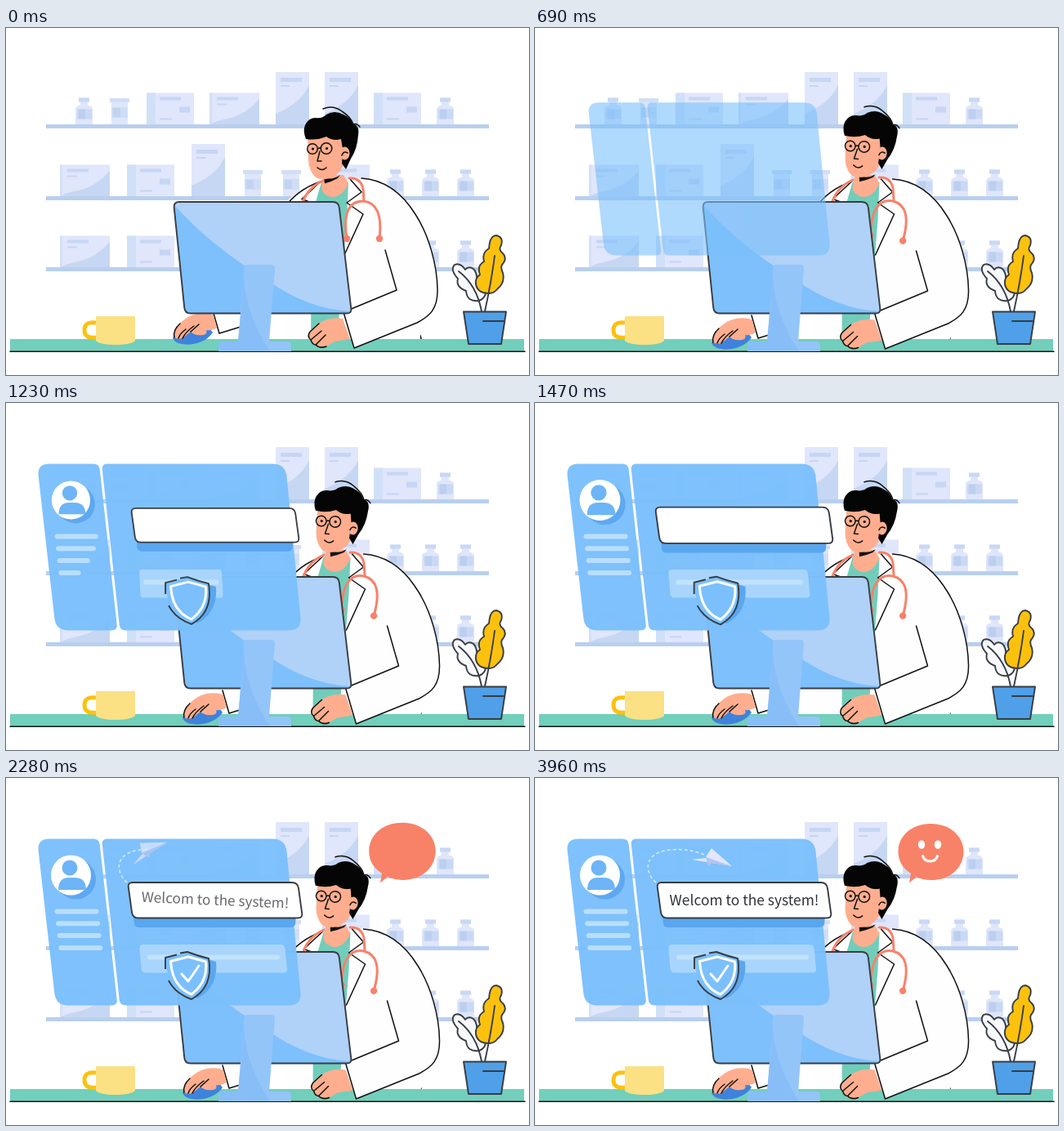
An HTML page that plays this animation: 640x425 px, repeating every 4500 ms.

```html
<!DOCTYPE html>
<html lang="en">
<head>
<meta charset="utf-8">
<title>Pharmacy desk</title>
<style>
html, body { margin: 0; width: 100%; height: 100%; overflow: hidden; background: #fff; }
svg { display: block; width: 100vw; height: 100vh; }
.ink { fill: none; stroke: #111; stroke-width: 1.5; stroke-linecap: round; stroke-linejoin: round; }
.coat { fill: #fefefe; }
.skin { fill: #feae8e; }
.steth { fill: none; stroke: #f8816a; stroke-width: 3; stroke-linecap: round; }
.edge { stroke: #383c43; stroke-width: 1.9; stroke-linejoin: round; }
.white { fill: none; stroke: #fff; stroke-width: 3; stroke-linecap: round; stroke-linejoin: round; }
text { font: 500 17.4px "Noto Sans CJK SC", "Noto Sans CJK JP", "Open Sans", sans-serif; fill: #2f3237; text-anchor: middle; }
</style>
</head>
<body>
<svg viewBox="0 0 640 425" xmlns="http://www.w3.org/2000/svg">
  <defs>
    <g id="bottle">
      <path d="M4 0H17V5H4ZM6 5H15V9Q21 10 21 14V33H0V14Q0 10 6 9Z" fill="#dfe6fa"/>
      <path d="M4 0H17V5H4ZM2 14H20V26H2Z" fill="#c9d8f4"/>
      <path d="M4 14H12V26H4Z" fill="#bccfef"/>
    </g>
    <g id="jar">
      <path d="M2 4H22V32H2Z" fill="#dfe6fa"/>
      <path d="M0 0H24V5H0Z" fill="#d2def6"/>
      <path d="M2 11H22V24H2Z" fill="#d0ddf6"/>
      <path d="M4 12H13V23H4Z" fill="#c0d3f1"/>
    </g>
    <g id="pack">
      <path d="M0 0H58V39H0Z" fill="#e0e6fb"/>
      <path d="M0 0H11V39H0Z" fill="#d0e0f6"/>
      <path d="M16 5H42V9H16ZM40 17H53V24H40ZM16 31H31V33H16Z" fill="#c6d6f4"/>
    </g>
    <g id="carton">
      <path d="M0 0H61V39H0Z" fill="#e0e6fb"/>
      <path d="M0 39Q8 34 20 32Q45 27 61 7V39Z" fill="#c6d7f3"/>
      <path d="M0 0H3V39H0Z" fill="#d3e0f7"/>
      <path d="M9 5H35V9H9ZM9 13H21V15H9Z" fill="#c6d6f4"/>
    </g>
    <g id="tall">
      <path d="M0 0H41V64H0Z" fill="#e0e6fb"/>
      <path d="M0 64V51Q30 39 41 16V64Z" fill="#c6d7f3"/>
      <path d="M6 7H32V12H6ZM6 16H17V18H6Z" fill="#c6d6f4"/>
    </g>
    <mask id="reveal" maskUnits="userSpaceOnUse" x="100" y="60" width="160" height="100">
      <path id="trailMask" class="white"/>
    </mask>
  </defs>
  <rect width="640" height="425" fill="#fff"/>
  <g id="shelves"></g>

  <path class="coat" d="M340 300H505V366L508 381H340Z"/>
  <path class="ink" d="M505 366L508 381"/>
  <g id="torso">
    <path class="coat" d="M340 220Q356 200 385 189L435 184C468 186 488 207 501.500 229L520 300V350L505 381H340Z"/>
    <path d="M386 189Q400 183 419 189L417 235L405 385H373L374 230Z" fill="#71cdba"/>
    <path class="coat" d="M385 188L363 210L376 216H340Q356 198 385 188Z"/>
    <path class="ink" d="M340 221Q356 198 385 188L362 209.500L374 214"/>
    <path class="coat" d="M421 185L435 201L417 214L437 228L414 278L424 350L470 330L450 190Z"/>
    <path class="ink" d="M421 185L435 201L417 214L437 228L414 278"/>
    <path class="skin" d="M389 180H413L419 190Q412 207 399 207Q387 205 386 196Z"/>
  </g>
  <path d="M5 381H634V396H5Z" fill="#71cfbb"/>
  <path d="M5 396.3H635" class="ink"/>

  <g id="mouseHand">
    <path d="M204 379C206 391 240 392 253 373L246 364Q224 367 204 379Z" fill="#3f82dc"/>
    <path class="coat" d="M253 346L261 374L300 362L298 335Z"/>
    <path class="ink" d="M253 346L261 374L300 362"/>
    <path class="skin" d="M206 379Q203 369 217 358Q230 347 250 350L254 352L258 367Q252 371 245 370Q247 375 241 376Q230 377 226 372L216 380Q210 382 206 379Z"/>
    <path class="ink" d="M206 379Q204 370 213 362M211 380Q213 374 220 369M216 380Q220 372 230 365M226 372L236 363"/>
  </g>

  <g id="sleeve">
    <path class="coat" d="M478 321L413 348L426 392L503 361C518 353 528.500 345 528 320C527.500 290 517.500 254 501.500 229L464 272Z"/>
    <path class="ink" d="M464 272L478 321L413 348L426 392L503 361C518 353 528.500 345 528 320C527.500 290 517.500 254 501.500 229C488 207 468 186 435 184"/>
  </g>
  <g id="restHand">
    <path class="skin" d="M412 356Q396 353 383 362L372 372Q368 378 373 382Q373 387 379 388Q384 394 392 390L402 384L421 381Z"/>
    <path class="ink" d="M383 362L372 372Q368 378 373 382L386 371M373 382Q375 388 379 388L391 376M379 388Q384 393 392 390"/>
  </g>

  <path id="neckTube" class="steth" d="M363 213Q370 195 388 187M420 184Q434 183 437 197L438 212"/>
  <g id="steth">
    <path class="steth" d="M417 258Q410 212 437 212Q462 214 457 258"/>
    <circle cx="417" cy="258" r="4.2" fill="#f8816a"/>
    <circle cx="457" cy="258" r="4.2" fill="#f8816a"/>
  </g>

  <g id="head">
    <path d="M389 183Q399 187 409 180L406 184Q399 188 390 190.500Z" fill="#111"/>
    <path class="skin" d="M369 130L370 162Q371 176 379 183Q386 187 396 184Q408 180 413 168L416 130Z"/>
    <path d="M367 136Q363 126 366 119Q370 110 379 110Q387 111 392 106Q402 100 413 106Q422 110 424 117Q433 119 431 131Q430 148 422 160L416 173L411 166L412 148L410 136Q400 139 392 133Q380 138 367 136Z" fill="#050505"/>
    <ellipse class="skin" cx="414.500" cy="153.500" rx="6" ry="8"/>
    <path class="ink" d="M411 156Q413 150 418 153M388 99Q400 94 411 102Q422 109 425 118Q429 116 433 121"/>
    <circle class="ink" cx="375" cy="148" r="6.300"/>
    <circle class="ink" cx="392" cy="147.500" r="6.800"/>
    <path class="ink" d="M381.500 148Q383 146 385 147.500M384 151L381 163H386M381 171Q387 176 392 171"/>
    <circle cx="375.500" cy="148" r="1.600"/><circle cx="392.500" cy="147.500" r="1.600"/>
  </g>

  <path d="M110 361Q96 359 96 370Q96 381 111 379" fill="none" stroke="#fcc10d" stroke-width="5"/>
  <path d="M110 353H158V383Q153 388 134 388Q115 388 110 383Z" fill="#fbe084"/>

  <g class="edge" fill="none" stroke-linecap="round">
    <path fill="#f7f9fd" d="M579 334Q564 336 563 322Q550 317 553 307Q543 296 549 290Q556 287 562 296Q566 291 572 295Q577 300 576 309Q588 312 587 323Q587 331 579 334Z"/>
    <path d="M554 298Q576 315 582 347"/>
    <path fill="#fcc10d" d="M591 325Q577 325 575 314Q574 306 580 302Q576 291 585 286Q582 275 591 270Q592 254 600 254Q609 256 606 266Q602 272 608 276Q614 282 607 290Q605 294 608 300Q611 312 601 320Q597 325 591 325Z"/>
    <path d="M598 279Q594 310 586 347"/>
    <path fill="#4fa0e8" d="M560 347.500H612L606 387H566Z"/>
    <path d="M584 359H609"/>
  </g>

  <path id="screen" fill="#b0d1f8"/>
  <path d="M206 219L219 344Q220 349 225 349H418L423 347Q370 345 318 308Q252 268 207 218Z" fill="#7dc0fb"/>
  <path id="bezel" class="edge" fill="none"/>
  <path d="M296 290H325Q329 290 329 295L322 384H344Q349 384 349 389V396H260V389Q260 384 265 384H284Q288 340 291 295Q291 290 296 290Z" fill="#93c5f9"/>
  <path d="M291 296Q290 345 323 396H260V389Q260 384 265 384H284Q289 340 291 296Z" fill="#88bef7"/>

  <g id="panel" fill="#7bc0fc"><path id="sideCard"/><path id="mainCard"/></g>

  <g id="avatar">
    <circle cx="85.500" cy="124" r="24.500" fill="#5da8f0"/>
    <circle cx="79.500" cy="119" r="24.500" fill="#fff"/>
    <circle cx="78" cy="110" r="9.500" fill="#6db5f7"/>
    <path d="M64 137Q64 122 77 122H84Q98 122 98 137Z" fill="#6db5f7"/>
  </g>
  <g id="rows" stroke="#b9defd" stroke-width="6" stroke-linecap="round"></g>
  <g id="pill">
    <path id="pillBox" fill="#a9d5fc"/>
    <path d="M176 219.500H332" stroke="#c1e2fd" stroke-width="6" stroke-linecap="round"/>
  </g>
  <g id="shield">
    <path d="M204 224L231 217L257 225Q260 256 234 270Z" fill="#5aa6ef"/>
    <path d="M195 220L223 213L249 221Q254 254 228 271Q196 260 195 220Z" fill="#7bc0fc"/>
    <path class="edge" fill="none" d="M195 234V220L209 216.500M213 214.500L222 213Q235 218 248 221Q254 256 227 271Q207 264 199 248"/>
    <path class="white" d="M201.500 224.500L223 219L244.500 225Q247 250 227 265Q203 255 201.500 224.500Z"/>
  </g>
  <path id="check" class="white" d="M215 240L223 249L236 230" pathLength="1" stroke-dasharray="1 2"/>

  <g id="trail" mask="url(#reveal)">
    <path id="route" fill="none" stroke="#d5eafd" stroke-width="1.500" stroke-dasharray="4 3" d="M148 128C131 112 136 90 166 88C186 86 202 91 217 98"/>
  </g>
  <g id="plane">
    <path d="M-25 2L-8 0L24 10ZM-1 -12L24 10L-8 -1Z" fill="#e3e6fc"/>
    <path d="M-8 0L24 10L-1 6L-5 10Z" fill="#b8c3ee"/>
  </g>

  <g id="box">
    <path id="boxShade" fill="#5aa6ef"/>
    <path id="boxFace" class="edge" fill="#fff"/>
  </g>
  <g id="hello"><text x="0" y="6">Welcom to the system!</text></g>

  <g id="bubble">
    <path d="M484 56C509 56 524.500 72 524.500 90C524.500 110 508 125 485 125Q474 125 467 121L458 128.500L460 117Q444 107 444.500 89C445 71 461 56 484 56Z" fill="#f88267"/>
  </g>
  <g id="face" fill="#fff">
    <ellipse class="eye" cx="473"/><ellipse class="eye" cx="494"/>
    <path id="smile" class="white" d="M474.500 95.500C477 104 490 104 492.500 95.500" pathLength="1" stroke-dasharray="1 2"/>
  </g>
</svg>
<script>
const LOOP = 4500;
const $ = id => document.getElementById(id);
const clamp = u => Math.max(0, Math.min(1, u));
const span = (t, a, b) => clamp((t - a) / (b - a));
const mix = (a, b, u) => a + (b - a) * u;
const easeOut = u => 1 - (1 - u) * (1 - u);
const easeInOut = u => (1 - Math.cos(Math.PI * u)) / 2;
const backOut = u => 1 + 2.1 * (u - 1) ** 3 + 1.1 * (u - 1) ** 2;

// Closed polygon with rounded corners; each point is [x, y, radius].
function rounded(points) {
  const n = points.length;
  const toward = (p, q) => {
    const k = p[2] / Math.hypot(q[0] - p[0], q[1] - p[1]);
    return `${mix(p[0], q[0], k)} ${mix(p[1], q[1], k)}`;
  };
  return points.map((p, i) =>
    `${i ? 'L' : 'M'}${toward(p, points[(i + n - 1) % n])}Q${p[0]} ${p[1]} ${toward(p, points[(i + 1) % n])}`
  ).join('') + 'Z';
}
const shape = (id, ...points) => $(id).setAttribute('d', rounded(points));

for (const id of ['screen', 'bezel'])
  shape(id, [205, 213, 7], [407, 213, 7], [423, 349.5, 6], [219, 349.5, 7]);
shape('sideCard', [38, 74.5, 15], [114, 74.5, 7], [136.5, 278.5, 7], [61, 278.5, 15]);
shape('mainCard', [117, 74.5, 7], [342, 74.5, 16], [362, 278.5, 16], [139.5, 278.5, 7]);
shape('pillBox', [163, 204, 5], [341, 204, 5], [344.5, 238.5, 5], [166, 238.5, 5]);
shape('boxShade', [155, 150, 5], [356, 150, 5], [354, 183, 6], [157, 183, 6]);
shape('boxFace', [149, 128, 6], [357, 128, 7], [363, 171.5, 6], [155, 171.5, 7]);

const shelves = [
  [118, { bottle: [85, 527], jar: [127], pack: [172, 450], carton: [249], tall: [330, 390] }],
  [206, { carton: [66], pack: [148, 387], tall: [227], jar: [290, 337], bottle: [466, 509, 552] }],
  [293, { carton: [66], pack: [148], bottle: [509, 552] }]
];
const heights = { bottle: 32.5, jar: 32, pack: 38.5, carton: 38.5, tall: 64 };
$('shelves').innerHTML = shelves.map(([y, items]) =>
  Object.entries(items).map(([kind, xs]) =>
    xs.map(x => `<use href="#${kind}" x="${x}" y="${y - heights[kind]}"/>`).join('')).join('') +
  `<rect x="49" y="${y}" width="542" height="5" fill="#b9cfee"/>`).join('');

$('rows').innerHTML = [0, 1, 2, 3].map(i =>
  `<path d="M${62.5 + i * 1.6} ${163.5 + i * 14.8}h48" pathLength="1" stroke-dasharray="1 2"/>`).join('');
const rows = [...$('rows').children];
const eyes = [...document.querySelectorAll('.eye')];
const route = $('route');
const routeLength = route.getTotalLength();
$('trailMask').setAttribute('d', route.getAttribute('d'));
$('trailMask').setAttribute('stroke-dasharray', `${routeLength} ${routeLength * 2}`);

const place = (id, value) => $(id).setAttribute('transform', value);
const fade = (id, value) => $(id).setAttribute('opacity', value);
const draw = (el, u) => {
  el.setAttribute('stroke-dashoffset', 1 - u);
  el.setAttribute('visibility', u > 0 ? 'visible' : 'hidden');
};

// Springy growth about a pivot.
function pop(id, t, start, cx, cy) {
  const u = span(t, start, start + 580);
  const k = mix(0.145, 1, backOut(u));
  place(id, `translate(${cx} ${cy}) scale(${k}) translate(${-cx} ${-cy})`);
  fade(id, clamp(u * 5));
}

function render(t) {
  const m = easeInOut(span(t, 0, 375));
  place('torso', `translate(${2.5 * m} 0)`);
  place('sleeve', `translate(${2.5 * m} ${m})`);
  place('restHand', `translate(${3.5 * m} ${1.5 * m})`);
  place('mouseHand', `translate(${12 * m} ${6 * m})`);
  place('neckTube', `translate(${m} ${-m})`);
  place('steth', `translate(${m} 0) rotate(${9.5 * m} 437 212)`);
  place('head', `translate(${7 * m} ${-1.5 * m}) rotate(${5 * m} 400 190)`);

  pop('panel', t, 480, 361, 279);
  fade('panel', t > 480 ? mix(0.35, 0.97, span(t, 510, 960)) : 0);

  pop('avatar', t, 990, 79, 119);
  pop('box', t, 990, 256, 150);
  pop('shield', t, 960, 224, 242);
  rows.forEach((row, i) => draw(row, easeOut(span(t, 1020 + i * 50, 1260 + i * 50))));
  const grow = easeOut(span(t, 1050, 1580));
  place('pill', `translate(163 0) scale(${grow} 1) translate(-163 0)`);
  fade('pill', grow > 0 ? 1 : 0);
  draw($('check'), easeInOut(span(t, 1600, 1980)));

  const fly = span(t, 1760, 2690);
  const p = easeInOut(fly);
  const at = route.getPointAtLength(routeLength * p);
  place('plane', `translate(${at.x} ${at.y}) rotate(${-105 * (1 - p)})`);
  fade('plane', clamp(fly * 1.3));
  fade('trail', fly > 0 ? 1 : 0);
  $('trailMask').setAttribute('stroke-dashoffset', routeLength * (1 - p));

  const h = easeOut(span(t, 2100, 2480));
  place('hello', `translate(256 149.700) rotate(${9 * (1 - h)}) scale(${mix(0.96, 1, h)})`);
  fade('hello', h);

  pop('bubble', t, 1800, 459, 128);
  fade('face', t >= 2790 ? 1 : 0);
  const open = t < 3500
    ? easeInOut(span(t, 2960, 3480))
    : Math.abs(Math.cos(Math.PI * span(t, 3500, 3960)));
  eyes.forEach((eye, i) => {
    eye.setAttribute('cx', i ? mix(494.5, 493, open) : mix(472.5, 473, open));
    eye.setAttribute('cy', mix(81, 81.5, open));
    eye.setAttribute('rx', mix(5.5, 4.2, open));
    eye.setAttribute('ry', mix(2.5, 5.3, open));
  });
  draw($('smile'), t >= 2970 ? mix(0.03, 1, easeInOut(span(t, 2970, 3450))) : 0);
}

const began = performance.now();
function tick() {
  render((performance.now() - began) % LOOP);
  requestAnimationFrame(tick);
}
tick();
</script>
</body>
</html>
```
